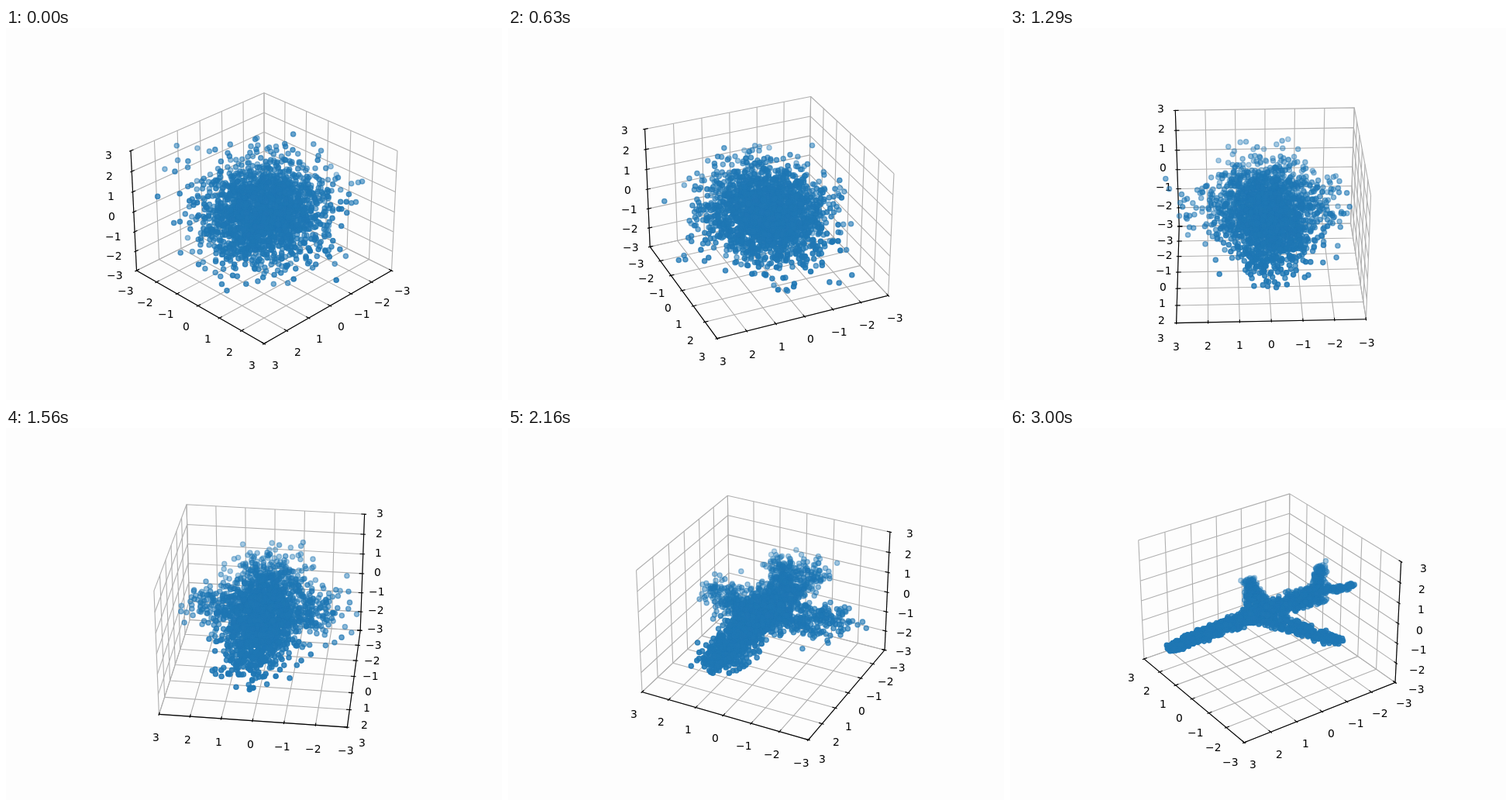
Animation, 640 px wide and 480 px high, one loop 3.03 s. Source, as an HTML page with a canvas:

```html
<!DOCTYPE html>
<html lang="en">
<head>
<meta charset="utf-8">
<title>Rotating point cloud</title>
<style>
  html, body { margin: 0; width: 100%; height: 100%; overflow: hidden; background: #fdfdfd; }
  canvas { display: block; }
</style>
</head>
<body>
<canvas id="stage" width="640" height="480"></canvas>
<script>
const ctx = document.getElementById('stage').getContext('2d');
const STEP_MS = 30, STEPS = 100, COUNT = 2048, LIMIT = 3;
const ELEV = Math.PI / 6, DIST = 10, ZOOM = 1997.8, CX = 333, CY = 237.4;
const UNIT = 0.198413, UNIT_Z = 0.14881;   // box size per data unit
const TICK_IN = 0.096, TICK_OUT = 0.048, LABEL_GAP = 0.498;
const TICKS = [-3, -2, -1, 0, 1, 2, 3];

let seed = 20231;
function rand() {
  seed = (seed + 0x6D2B79F5) | 0;
  let t = Math.imul(seed ^ (seed >>> 15), seed | 1);
  t ^= t + Math.imul(t ^ (t >>> 7), t | 61);
  return ((t ^ (t >>> 14)) >>> 0) / 4294967296;
}
const spread = size => (rand() - 0.5) * size;
const gauss = () => Math.sqrt(-2 * Math.log(1 - rand())) * Math.cos(2 * Math.PI * rand());

// One random point of the aeroplane: fuselage, swept wings or tail.
function planePoint() {
  const part = rand(), side = rand() < 0.5 ? -1 : 1;
  let p;
  if (part < 0.55) {
    const y = -2.15 + 5.9 * rand();
    const r = (0.32 - 0.045 * y) * Math.sqrt(rand()), a = 2 * Math.PI * rand();
    p = [r * Math.cos(a), y, 0.11 - 0.014 * y * y + r * Math.sin(a)];
  } else if (part < 0.88) {
    const s = rand() ** 1.35;
    p = [side * 2.55 * s, 0.3 - 1.3 * s + spread(1 - 0.65 * s), -0.05 - 0.25 * s + spread(0.12)];
  } else {
    const s = rand();
    p = [side * 0.87 * s, -1.95 - 0.85 * s + spread(0.4), 0.2 + 0.45 * s + spread(0.16)];
  }
  return p.map(v => v + 0.055 * gauss());
}

// Noise turns step by step into the shape; the noise itself wanders.
function buildClouds() {
  const shape = Array.from({ length: COUNT }, planePoint).flat();
  const noise = shape.map(gauss);
  const clouds = [];
  for (let k = 0; k <= STEPS; k++) {
    const t = k / STEPS, left = 1 - t;
    const signal = Math.exp(-0.9 * left * left) * (1 - left ** 8);
    const sigma = Math.sqrt(1 - signal * signal) * (1 - 0.25 * t);
    clouds.push(Float32Array.from(shape, (v, i) => signal * v + sigma * noise[i]));
    const fresh = Math.min(1, 0.05 * left / (sigma * sigma + 1e-4));
    const keep = Math.sqrt(1 - fresh), add = Math.sqrt(fresh);
    for (let i = 0; i < noise.length; i++) noise[i] = keep * noise[i] + add * gauss();
  }
  return clouds;
}
const clouds = buildClouds();

function makeProjection(azim) {
  const ca = Math.cos(azim), sa = Math.sin(azim), ce = Math.cos(ELEV), se = Math.sin(ELEV);
  return (x, y, z) => {
    const right = (y * ca - x * sa) * UNIT, toward = (x * ca + y * sa) * UNIT, up = z * UNIT_Z;
    const depth = DIST - ce * toward - se * up;
    return [CX + right / depth * ZOOM, CY - (ce * up - se * toward) / depth * ZOOM, depth];
  };
}

function polyline(project, color, points) {
  ctx.strokeStyle = color;
  ctx.beginPath();
  for (const p of points) {
    const [x, y] = project(...p);
    ctx.lineTo(x, y);
  }
  ctx.stroke();
}

function label(project, v, pos) {
  const text = v < 0 ? '\u2212' + -v : String(v);
  const [x, y] = project(...pos);
  ctx.fillText(text, Math.floor(x - ctx.measureText(text).width / 2), Math.round(y + 11));
}

function drawAxes(project, azim) {
  const sx = Math.cos(azim) > -1e-9 ? 1 : -1, sy = Math.sin(azim) > 0 ? 1 : -1;
  const nx = LIMIT * sx, ny = LIMIT * sy, lo = -LIMIT, hi = LIMIT;
  const grid = points => polyline(project, '#b0b0b0', points);
  const line = (...points) => polyline(project, '#000', points);
  const gx = nx + LABEL_GAP * sx, gy = ny + LABEL_GAP * sy, gz = lo - LABEL_GAP;
  const inX = nx - TICK_IN * sx, outX = nx + TICK_OUT * sx;
  const inY = ny - TICK_IN * sy, outY = ny + TICK_OUT * sy;

  ctx.lineWidth = 1.11;
  ctx.lineJoin = 'round';
  ctx.lineCap = 'butt';
  for (const v of TICKS) {
    grid([[v, ny, lo], [v, -ny, lo], [v, -ny, hi]]);
    grid([[nx, v, lo], [-nx, v, lo], [-nx, v, hi]]);
    grid([[nx, -ny, v], [-nx, -ny, v], [-nx, ny, v]]);
  }
  ctx.lineCap = 'square';
  line([lo, ny, lo], [hi, ny, lo]);
  line([nx, lo, lo], [nx, hi, lo]);
  line([nx, -ny, lo], [nx, -ny, hi]);

  ctx.fillStyle = '#000';
  ctx.font = '13.89px "DejaVu Sans", sans-serif';
  for (const v of TICKS) {
    line([v, inY, lo], [v, outY, lo]);
    line([inX, v, lo], [outX, v, lo]);
    line([inX, -ny, v], [outX, -ny, v]);
    label(project, v, [v, gy, gz]);
    label(project, v, [gx, v, gz]);
    label(project, v, [gx, -gy, v]);
  }
}

function drawCloud(project, cloud) {
  const dots = [];
  for (let i = 0; i < cloud.length; i += 3) dots.push(project(cloud[i], cloud[i + 1], cloud[i + 2]));
  dots.sort((a, b) => b[2] - a[2]);
  const far = dots[0][2], near = dots[COUNT - 1][2];
  ctx.fillStyle = ctx.strokeStyle = '#1f77b4';
  ctx.lineWidth = 1.39;
  for (const [x, y, depth] of dots) {
    ctx.globalAlpha = 1 - 0.7 * (depth - near) / (far - near);
    ctx.beginPath();
    ctx.arc(x, y, 3.106, 0, 2 * Math.PI);
    ctx.fill();
    ctx.stroke();
  }
  ctx.globalAlpha = 1;
}

let shown = -1;
function draw(step) {
  const azim = (45 + step) * Math.PI / 180, project = makeProjection(azim);
  ctx.fillStyle = '#fdfdfd';
  ctx.fillRect(0, 0, 640, 480);
  drawAxes(project, azim);
  drawCloud(project, clouds[step]);
  shown = step;
}

const start = performance.now();
function tick() {
  const step = Math.floor((performance.now() - start) / STEP_MS) % (STEPS + 1);
  if (step !== shown) draw(step);
  requestAnimationFrame(tick);
}
draw(0);
requestAnimationFrame(tick);
</script>
</body>
</html>
```
